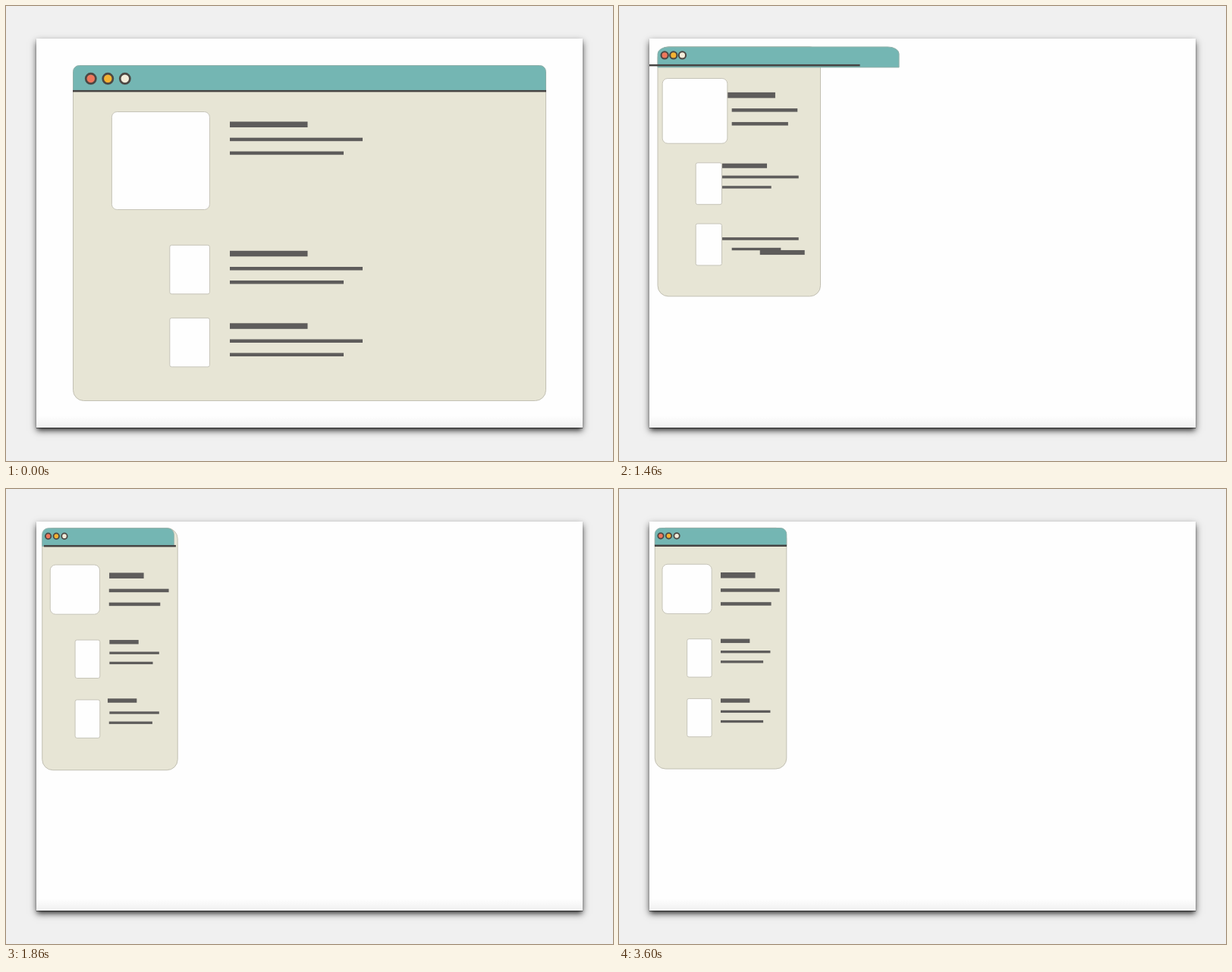
Write an HTML page that moves like this. It is 800 px wide and 600 px high and loops after 3.74 s.

```html
<!DOCTYPE html>
<html lang="en">
<head>
<meta charset="utf-8">
<title>Responsive window</title>
<style>
  html, body { margin: 0; width: 100%; height: 100%; overflow: hidden; background: #f0f0f0; }
  #panel {
    position: absolute; left: 40px; top: 43px; width: 720px; height: 513px;
    background: linear-gradient(#fefefe 97%, #f0f0f0);
    box-shadow: 0 1px 1px rgba(0, 0, 0, .45), 0 5px 5px -2px rgba(0, 0, 0, .38),
      0 4px 9px rgba(0, 0, 0, .62);
    overflow: hidden;
  }
  svg { display: block; }
  .body { fill: #e7e5d5; stroke: #c2c0b3; }
  .head { fill: #74b6b3; stroke: #8fb0aa; }
  .rule { fill: #474443; }
  .card { fill: #fefefe; stroke: #c6c4b8; }
  .bar { fill: #5e5c5b; }
  circle { stroke: #4c4844; }
</style>
</head>
<body>
<div id="panel"><svg id="art" width="720" height="513" viewBox="40 43 720 513"></svg></div>
<script>
const LOOP = 3740, STEP = 20;
const SPRING_START = 1326.3, EASE_START = 1317, EASE_TIME = 360;
const art = document.getElementById('art');
const parts = [];

const mix = (a, b, k) => a + (b - a) * k;

// Underdamped spring from 0 to 1
function spring(ms) {
  if (ms <= 0) return 0;
  const t = ms / 1000, decay = 8.33, w = 13.97;
  return 1 - Math.exp(-decay * t) * (Math.cos(w * t) + decay / w * Math.sin(w * t));
}

// cubic-bezier(.25, .1, .25, 1)
function ease(x) {
  if (x <= 0) return 0;
  if (x >= 1) return 1;
  let lo = 0, hi = 1;
  for (let i = 0; i < 24; i++) {
    const u = (lo + hi) / 2;
    if (.75 * u * (1 - u) + u ** 3 < x) lo = u; else hi = u;
  }
  const u = lo, v = 1 - u;
  return .3 * u * v * v + 3 * u * u * v + u ** 3;
}

function add(tag, attrs) {
  const el = document.createElementNS('http://www.w3.org/2000/svg', tag);
  set(el, attrs);
  return art.appendChild(el);
}

function set(el, attrs) {
  for (const key in attrs) el.setAttribute(key, attrs[key]);
}

// Boxes are {x, y, w, h}; each option names the progress to use: spring (p) or ease (s)
function blend(a, b, k, { pos = 'p', w = 's', h = 's', anchor = .5 } = {}) {
  const width = mix(a.w, b.w, k[w]), height = mix(a.h, b.h, k[h]);
  return {
    x: mix(a.x + a.w * anchor, b.x + b.w * anchor, k[pos]) - width * anchor,
    y: mix(a.y + a.h * anchor, b.y + b.h * anchor, k[pos]) - height * anchor,
    width, height
  };
}

function rect(name, a, b, opts, rx = 0) {
  const el = add('rect', { class: name, rx });
  parts.push(k => set(el, blend(a, b, k, opts)));
}

const box = (x, y, w, h) => ({ x, y, w, h });
const springy = { w: 'p', h: 'p' };

// The header's rounded corners stretch with it while it shrinks
function header(a, b) {
  const el = add('path', { class: 'head' });
  parts.push(k => {
    const { x, y, width, height } = blend(a, b, k, { anchor: 0 });
    const ref = k.s ? b : a;
    const rx = 8 * width / ref.w, ry = 8 * height / ref.h;
    set(el, {
      d: `M${x} ${y + height}V${y + ry}a${rx} ${ry} 0 0 1 ${rx} ${-ry}` +
        `H${x + width - rx}a${rx} ${ry} 0 0 1 ${rx} ${ry}V${y + height}Z`
    });
  });
}

function dot(i, fill) {
  const el = add('circle', { fill });
  parts.push(k => set(el, {
    cx: mix(111.8 + 22.5 * i, 55 + 10.55 * i, k.p), cy: mix(95.8, 61.8, k.p),
    r: mix(6.6, 3.7, k.s), 'stroke-width': mix(2.7, 1.8, k.s)
  }));
}

// Title and two lines: [width, height, distance below the row's top]
const BARS = [[102.5, 7.5, 0], [175, 4.5, 21.2], [150, 4.5, 39.2]];

function bars(y0, y1, sx, sy, motions) {
  BARS.forEach(([w, h, dy], i) => rect('bar',
    box(295, y0 + dy, w, h), box(134, y1 + dy * sy, w * sx, h * sy), motions[i]));
}

// Bars nested in one frame that moves as a whole
function groupedBars(y0, y1, sx, sy, motions) {
  const size = 43.7;
  const a = box(295, y0, 175, size), b = box(134, y1, 175 * sx, size * sy);
  BARS.forEach(([w, h, dy], i) => {
    const el = add('rect', { class: 'bar' });
    parts.push(k => {
      const { x, y } = blend(a, b, k);
      const scale = (s, m) => mix(1, s, k[m]);
      set(el, {
        x, y: y + dy * scale(sy, 'p'),
        width: w * scale(sx, motions[i].w || 's'), height: h * scale(sy, motions[i].h || 's')
      });
    });
  });
}

// Cards share one right edge
function card(y0, y1, w0, h0, w1, h1, opts, r) {
  rect('card', box(268.4 - w0, y0, w0, h0), box(122.2 - w1, y1, w1, h1), opts, r);
}

const smallCard = (y0, y1) => card(y0, y1, 52.6, 64.5, 32.5, 50.4, { w: 'p' }, 2.5);

rect('body', box(88.5, 78.5, 623, 442), box(47.3, 51.3, 173.5, 317.7), springy, 14);
header(box(88.5, 78.5, 623, 33.5), box(47.3, 51.5, 173.5, 23.8));
rect('rule', box(88, 110.9, 624, 2.5), box(47, 73.5, 174, 2.5));
['#ee775c', '#f5b232', '#f3ecda'].forEach((fill, i) => dot(i, fill));

bars(152.5, 110, .444, 1, [{}, springy, springy]);
groupedBars(322.8, 197.6, .374, .73, [{}, {}, springy]);
bars(418.3, 276.3, .374, .73, [{ pos: 's' }, {}, springy]);

card(139.5, 99.2, 129, 129, 65.2, 65.2, {}, 7);
smallCard(315.3, 197.7);
smallCard(411.4, 276.4);

const start = performance.now();
function draw() {
  const t = Math.floor((performance.now() - start) % LOOP / STEP) * STEP;
  const k = { p: spring(t - SPRING_START), s: ease((t - EASE_START) / EASE_TIME) };
  for (const part of parts) part(k);
  requestAnimationFrame(draw);
}
draw();
</script>
</body>
</html>
```
